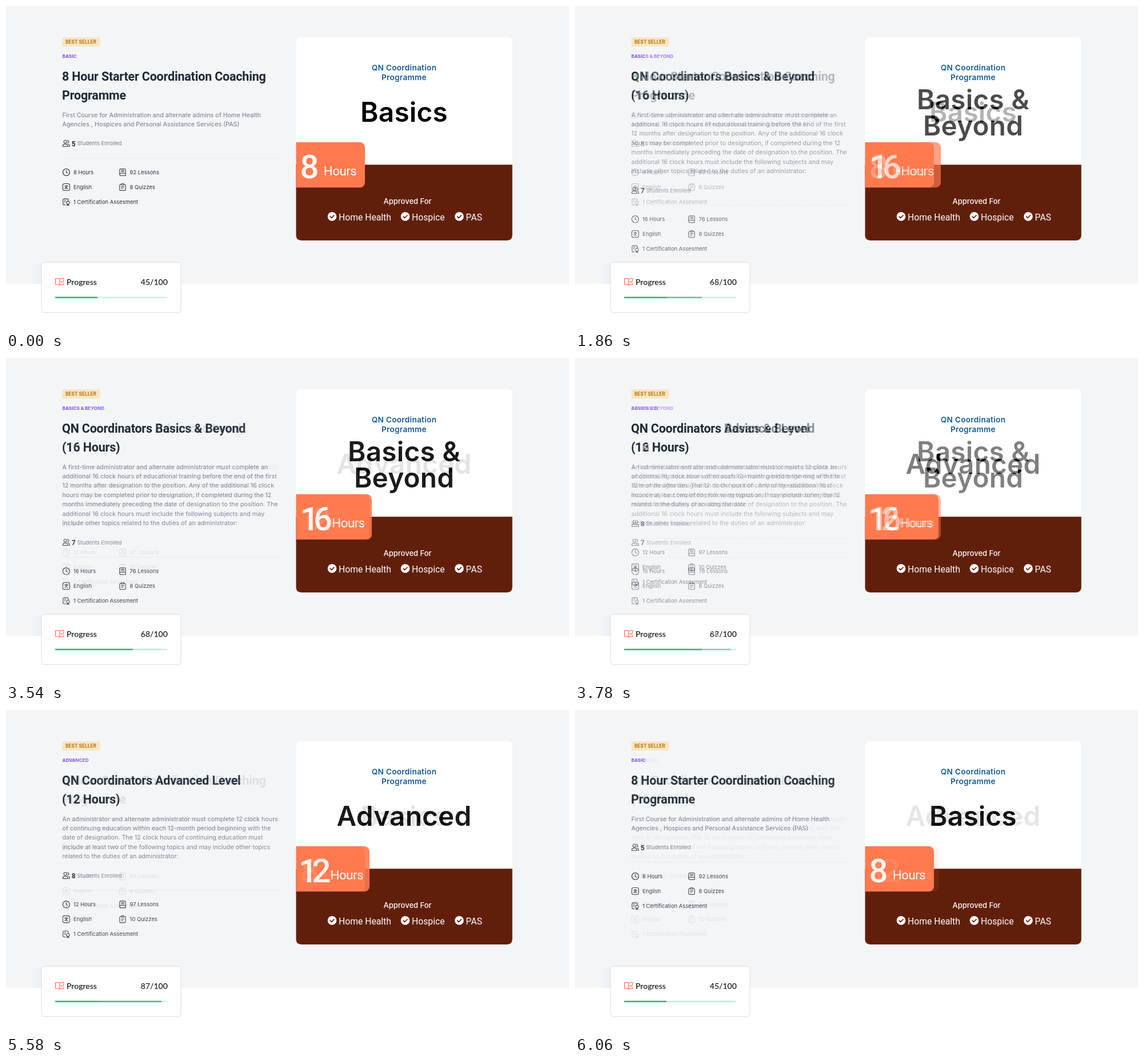
Write an HTML page that moves like this. It is 985 px wide and 568 px high and loops after 6.12 s.

```html
<!DOCTYPE html>
<html lang="en">
<head>
<meta charset="utf-8">
<title>Course cards</title>
<style>
html, body { margin: 0; width: 100%; height: 100%; overflow: hidden; background: #fff; }
svg { display: block; width: 100%; height: 100%; font-optical-sizing: none; }
text { font-family: Inter, "Open Sans", sans-serif; white-space: pre; }
.badge { font-size: 8.35px; font-weight: 700; fill: #b9730c; }
.level { font-size: 8.1px; font-weight: 700; fill: #7c4df0; }
.title { font: 700 21.5px Roboto, sans-serif; letter-spacing: -.2px; fill: #1f2a37; }
.desc { font-size: 10.75px; fill: #717c89; }
.count { font: 700 12px Roboto, sans-serif; fill: #1f2a37; }
.small { font-size: 9.4px; fill: #717c89; }
.fact { font-size: 9.45px; fill: #27323f; }
.icon { fill: none; stroke: #27323f; stroke-width: 1.05; stroke-linecap: round; stroke-linejoin: round; }
.brand { font-size: 13.6px; font-weight: 600; letter-spacing: .3px; fill: #155b98; }
.big { font-size: 47.6px; font-weight: 600; letter-spacing: .3px; fill: #000; }
.num { font: 500 58px Roboto, sans-serif; fill: #fff; }
.hours { font: 400 22.3px Roboto, sans-serif; letter-spacing: -.5px; fill: #fff; }
.approved { font-size: 13px; font-weight: 500; fill: #fff; }
.field { font: 400 15.7px Roboto, sans-serif; fill: #fff; }
.progress { font: 500 14px Lato, Carlito, sans-serif; fill: #111; }
.mid { text-anchor: middle; }
.end { text-anchor: end; }
</style>
</head>
<body>
<svg id="stage" viewBox="0 0 985 568" preserveAspectRatio="none"></svg>
<script>
const LINE = 16.45;
const LOOP = 6120, STEP = 60, STEPS = 10;
const STARTS = [1500, 3540, 5580];

const courses = [
  {
    level: 'BASIC',
    title: ['8 Hour Starter Coordination Coaching', 'Programme'],
    desc: [
      'First Course for Administration and alternate admins of Home Health',
      'Agencies , Hospices and Personal Assistance Services (PAS)'
    ],
    students: 5, hours: 8, lessons: 92, quizzes: 8, progress: 45, barEnd: 160,
    big: ['Basics'], tagEnd: 628, numX: 514.5, numGap: 0, hoursX: 555.8
  },
  {
    level: 'BASICS & BEYOND',
    title: ['QN Coordinators Basics & Beyond', '(16 Hours)'],
    desc: [
      'A first-time administrator and alternate administrator must complete an',
      'additional 16 clock hours of educational training before the end of the first',
      '12 months after designation to the position. Any of the additional 16 clock',
      'hours may be completed prior to designation, if completed during the 12',
      'months immediately preceding the date of designation to the position. The',
      'additional 16 clock hours must include the following subjects and may',
      'include other topics related to the duties of an administrator:'
    ],
    students: 7, hours: 16, lessons: 76, quizzes: 8, progress: 68, barEnd: 222,
    big: ['Basics &', 'Beyond'], tagEnd: 640, numX: 515, numGap: -10, hoursX: 570.3
  },
  {
    level: 'ADVANCED',
    title: ['QN Coordinators Advanced Level', '(12 Hours)'],
    desc: [
      'An administrator and alternate administrator must complete 12 clock hours',
      'of continuing education within each 12-month period beginning with the',
      'date of designation. The 12 clock hours of continuing education must',
      'include at least two of the following topics and may include other topics',
      'related to the duties of an administrator:'
    ],
    students: 8, hours: 12, lessons: 97, quizzes: 10, progress: 87, barEnd: 272,
    big: ['Advanced'], tagEnd: 636, numX: 512, numGap: -9.5, hoursX: 567.5
  }
];

// Icon outlines, centred on 0,0
const icons = {
  users: 'M-1.6 -5.8a2.7 2.7 0 1 0 .01 0M-6 5.2v-1a3 3 0 0 1 3-3h2.6a3 3 0 0 1 3 3v1zM2.4 -5.6a2.6 2.6 0 0 1 0 5.1M3.6 1.4a2.8 2.8 0 0 1 2.3 2.8v1h-1.6',
  clock: 'M0 -6a6 6 0 1 0 .01 0M0 -3.4v3.6l2.2 1.4',
  language: 'M-3.2 -6h6.4a2.8 2.8 0 0 1 2.8 2.8v6.4a2.8 2.8 0 0 1 -2.8 2.8h-6.4a2.8 2.8 0 0 1 -2.8 -2.8v-6.4a2.8 2.8 0 0 1 2.8 -2.8M-2.8 -2h5.6M0 -3.2v1.2M1.8 -2c-.5 2.4-2.2 4.2-4.4 5M-1.6 -.4c.8 1.6 2.2 2.8 4.2 3.4',
  lessons: 'M-3 -6h6.2a2 2 0 0 1 2 2v10h-8.2a2.2 2.2 0 0 1 -2.2 -2.2v-7.6a2.2 2.2 0 0 1 2.2 -2.2M-5.2 3.8a2 2 0 0 1 2 -2h8.4M-2.4 -3.4h5M-2.4 -1h5',
  quizzes: 'M-2 -4.8h-1.2a2 2 0 0 0 -2 2v6.8a2 2 0 0 0 2 2h6.4a2 2 0 0 0 2 -2v-6.8a2 2 0 0 0 -2 -2h-1.2M-2 -6h4v2.4h-4zM-2.4 -.4h4.8M-2.4 2.4h3',
  certificate: 'M-1 5.2h-2.6a2 2 0 0 1 -2 -2v-6.6a2 2 0 0 1 2 -2h5.4a2 2 0 0 1 2 2v1M-3.2 -2.6h2.4M-3.2 0h1.6M3 -1.4a2.7 2.7 0 1 0 .01 0M1.5 3.6v2.8l1.5-.9 1.5.9v-2.8',
  book: 'M0 -4.6c-1-1-2.2-1.4-3.6-1.4h-3.6v10.6h4c1.4 0 2.4.4 3.2 1.4.8-1 1.8-1.4 3.2-1.4h4v-2.4M0 -4.6v10.6M0 -4.6c1-1 2.2-1.4 3.6-1.4h3.6v2M2.4 -.6l1.6 1.6 3.4-3.4'
};

const safe = s => String(s).replace(/&/g, '&amp;');
const text = (cls, x, y, s, extra = '') =>
  `<text class="${cls}" x="${x}" y="${y}" ${extra}>${safe(s)}</text>`;
const rect = (x, y, w, h, fill, r = 0, extra = '') =>
  `<rect x="${x}" y="${y}" width="${w}" height="${h}" rx="${r}" fill="${fill}" ${extra}/>`;
const icon = (name, x, y, extra = '') =>
  `<path class="icon" d="${icons[name]}" transform="translate(${x} ${y})" ${extra}/>`;
const bar = (end, color) =>
  `<path d="M87 511H${end - 1.2}" stroke="${color}" stroke-width="2.6" stroke-linecap="round"/>`;
const fact = (name, x, y, s) => icon(name, x, y) + text('fact', x + 12.6, y + 3.5, s);

function details(c) {
  const y = 241 + LINE * (c.desc.length - 2);
  return rect(98.5, 55, 66.3, 16, '#fae5c1', 2.5) +
    text('badge', 104, 66, 'BEST SELLER') +
    text('level', 98.6, 91, c.level) +
    c.title.map((s, i) => text('title', 98, 131 + 32.8 * i, s)).join('') +
    c.desc.map((s, i) => text('desc', 98.5, 194.5 + LINE * i, s)).join('') +
    icon('users', 105.4, y) +
    text('count', 114.8, y + 4.6, c.students) +
    text('small', 124.6, y + 3.4, 'Students Enrolled') +
    `<path d="M98 ${y + 26}H480" stroke="#dde1e6" stroke-width=".9" stroke-dasharray="2 1"/>` +
    fact('clock', 105.4, y + 50.5, c.hours + ' Hours') +
    fact('lessons', 204, y + 50.5, c.lessons + ' Lessons') +
    fact('language', 105.4, y + 76.5, 'English') +
    fact('quizzes', 204, y + 76.5, c.quizzes + ' Quizzes') +
    fact('certificate', 105.4, y + 102.5, '1 Certification Assesment');
}

function field(x, s) {
  return `<circle cx="${x}" cy="369" r="7.8" fill="#fff"/>` +
    `<path d="M${x - 3.3} 369.2l2.4 2.4 4.4-4.6" fill="none" stroke="#611f0b" stroke-width="1.7" stroke-linecap="round" stroke-linejoin="round"/>` +
    text('field', x + 11.6, 375.6, s);
}

function poster(c) {
  const top = c.big.length > 1 ? 180.5 : 203;
  return '<path d="M507.5 279V63.5a8.5 8.5 0 0 1 8.5-8.5H877.3a8.5 8.5 0 0 1 8.5 8.5V279z" fill="#fff"/>' +
    '<path d="M507.5 278.3H885.8V402.5a8.5 8.5 0 0 1-8.5 8.5H516a8.5 8.5 0 0 1-8.5-8.5z" fill="#611f0b"/>' +
    text('brand mid', 696.5, 113, 'QN Coordination') +
    text('brand mid', 696.5, 129.6, 'Programme') +
    c.big.map((s, i) => text('big mid', 696.6, top + 46.5 * i, s)).join('') +
    `<path d="M507.5 238.8H${c.tagEnd - 9}a9 9 0 0 1 9 9V309.3a9 9 0 0 1-9 9H507.5z" fill="#ff7a4e"/>` +
    text('num', c.numX, 302, c.hours, `style="letter-spacing:${c.numGap}px"`) +
    text('hours', c.hoursX, 296.8, 'Hours') +
    text('approved mid', 702.6, 347, 'Approved For') +
    field(570.5, 'Home Health') + field(698.5, 'Hospice') + field(793, 'PAS');
}

function progress(c) {
  return rect(42, 452, 22, 35.5, 'url(#shade)') +
    rect(62, 449.3, 244, 88.2, '#fff', 6, 'stroke="#d9dde1" stroke-width="1"') +
    icon('book', 93.8, 483.6, 'style="stroke:#ff7a4e;stroke-width:1.3"') +
    text('progress', 106, 489.3, 'Progress') +
    text('progress end', 282.8, 489.3, c.progress + '/100') +
    bar(282.5, '#cfede2') + bar(c.barEnd, '#31b27e');
}

const scene = c => '<g class="scene">' + rect(0, 0, 985, 568, '#fff') +
  rect(0, 0, 985, 487.5, '#f4f5f7') + details(c) + poster(c) + progress(c) + '</g>';

const stage = document.getElementById('stage');
stage.innerHTML =
  '<defs><linearGradient id="shade"><stop offset="0" stop-color="#e6edf3" stop-opacity="0"/>' +
  '<stop offset="1" stop-color="#e6edf3" stop-opacity=".7"/></linearGradient></defs>' +
  [...courses, courses[0]].map(scene).join('');
const layers = [...stage.querySelectorAll('.scene')].slice(1);

// Each opaque scene dissolves in over the one below it
function draw(time) {
  const t = time % LOOP;
  layers.forEach((layer, i) => {
    const step = Math.floor((t - STARTS[i]) / STEP) + 1;
    const shown = Math.max(0, Math.min(1, step / STEPS));
    layer.setAttribute('opacity', shown);
    layer.setAttribute('visibility', shown ? 'visible' : 'hidden');
  });
}

let start;
function tick(now) {
  start ??= now;
  draw(now - start);
  requestAnimationFrame(tick);
}
draw(0);
requestAnimationFrame(tick);
</script>
</body>
</html>
```
